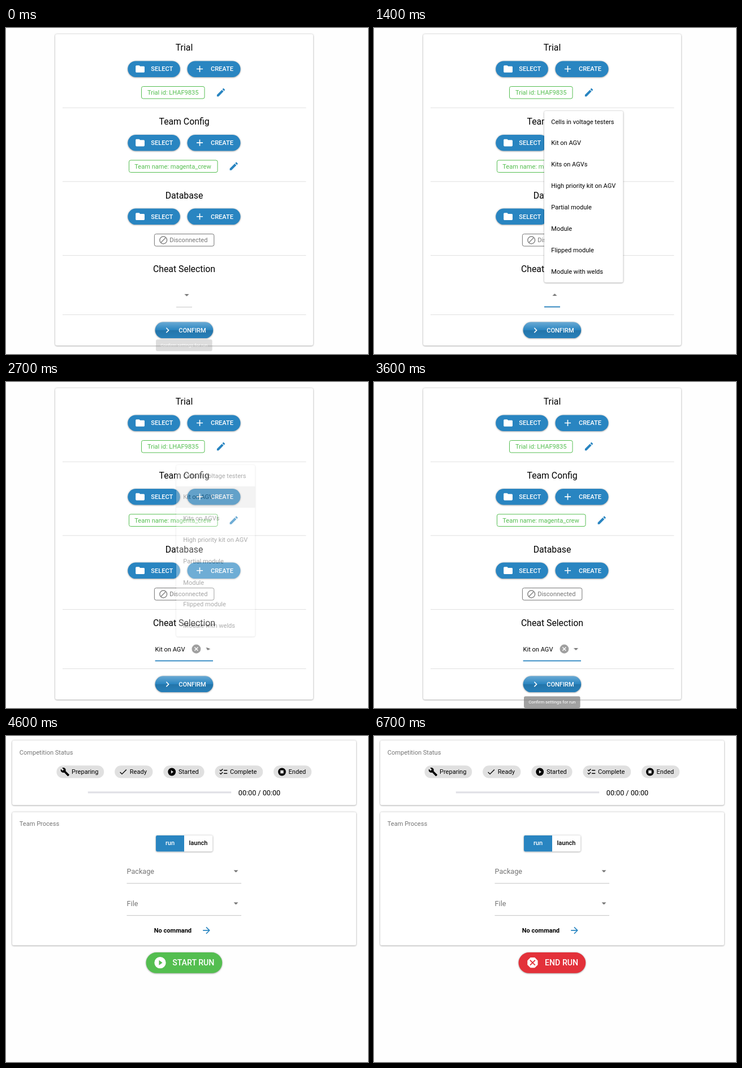
Animation of 640x577 px, one loop 8 s. Source, as an HTML page:

```html
<!DOCTYPE html>
<html lang="en">
<head>
<meta charset="utf-8">
<title>Run setup</title>
<style>
html, body { margin: 0; width: 100%; height: 100%; overflow: hidden; background: #fefefe; }
svg { display: block; width: 640px; height: 577px; font: 11.06px Roboto, sans-serif; --blue: #2985c1; --green: #54be50; }
.mid { text-anchor: middle; }
.title { font-size: 15.8px; }
.big { font-size: 12.64px; }
.btn { font-weight: 500; fill: #fff; color: #fff; }
.large { font-size: 14.2px; }
.grey { fill: #757575; }
.blue { fill: var(--blue); color: var(--blue); }
.arrow { color: #757575; }
.card { fill: #fff; }
.card, .raised { filter: drop-shadow(0 1.4px 1px rgba(0,0,0,.2)) drop-shadow(0 .6px 1.8px rgba(0,0,0,.24)); }
.rule { stroke: #e0e0e0; }
.line { stroke: #c2c2c2; }
.chip { fill: none; stroke: currentColor; }
.tip { font-size: 7.9px; fill: #fff; }

/* One loop is 8 s, so 1% is 80 ms. */
.setup, .run, .empty, .chosen, .start, .end { animation: 8s step-end infinite; }
.setup { animation-name: setup; }
.run { animation-name: run; }
.empty { animation-name: empty; }
.chosen { animation-name: chosen; }
.start { animation-name: start; }
.end { animation-name: end; }
@keyframes setup { 0% { visibility: visible } 50%, 100% { visibility: hidden } }
@keyframes run { 0% { visibility: hidden } 50%, 100% { visibility: visible } }
@keyframes empty { 0% { opacity: 1 } 31.25%, 100% { opacity: 0 } }
@keyframes chosen { 0% { opacity: 0 } 31.25%, 100% { opacity: 1 } }
@keyframes start { 0% { opacity: 1 } 76.25%, 100% { opacity: 0 } }
@keyframes end { 0% { opacity: 0 } 76.25%, 100% { opacity: 1 } }

.tip, .menu, .focus, .turn-up, .turn-down, .over, .glow { animation: 8s linear infinite; }
.tip { animation-name: tip; }
.menu { animation-name: menu; }
.focus { animation-name: focus; transform-origin: 315px 493px; }
.turn-up { animation-name: turn-up; transform-origin: 319.5px 472.5px; }
.turn-down { animation-name: turn-down; transform-origin: 357px 472.5px; }
.over { animation-name: over; }
.glow { animation-name: glow; }
@keyframes tip {
  0% { opacity: .25; transform: translateY(2.96px) }
  1.25%, 43.75% { opacity: 0; transform: translateY(0) }
  45% { opacity: .68; transform: translateY(8.06px) }
  46.9%, 100% { opacity: 1; transform: translateY(11.85px) }
}
@keyframes menu { 0%, 6.25% { opacity: 0 } 10%, 31.25% { opacity: 1 } 35%, 100% { opacity: 0 } }
@keyframes focus { 0%, 6.25% { transform: scaleX(0) } 10%, 100% { transform: scaleX(1) } }
@keyframes turn-up { 0%, 6.25% { transform: rotate(0) } 10%, 100% { transform: rotate(180deg) } }
@keyframes turn-down { 0%, 31.25% { transform: rotate(180deg) } 33.75% { transform: rotate(20deg) } 35%, 100% { transform: rotate(0) } }
@keyframes over {
  0% { opacity: 0; transform: translateY(227.7px) }
  18.7% { opacity: 0; transform: translateY(227.7px) }
  18.75% { opacity: 1; transform: translateY(227.7px); animation-timing-function: steps(6) }
  26.25%, 100% { opacity: 1; transform: translateY(0) }
}
@keyframes glow { 0%, 71.25% { opacity: 0 } 74%, 76.25% { opacity: .15 } 76.3%, 100% { opacity: 0 } }
</style>
</head>
<body>
<svg viewBox="0 0 640 577">
  <defs>
    <symbol id="folder" viewBox="0 0 24 24"><path fill="currentColor" d="M10 4H4c-1.1 0-2 .9-2 2v12c0 1.1.9 2 2 2h16c1.1 0 2-.9 2-2V8c0-1.1-.9-2-2-2h-8z"/></symbol>
    <symbol id="plus" viewBox="0 0 24 24"><path fill="currentColor" d="M19 13h-6v6h-2v-6H5v-2h6V5h2v6h6z"/></symbol>
    <symbol id="pencil" viewBox="0 0 24 24"><path fill="currentColor" d="M3 17.25V21h3.75L17.81 9.94l-3.75-3.75zM20.71 7.04c.39-.39.39-1.02 0-1.41l-2.34-2.34c-.39-.39-1.02-.39-1.41 0l-1.83 1.83 3.75 3.75z"/></symbol>
    <symbol id="drop" viewBox="0 0 24 24"><path fill="currentColor" d="M7 10l5 5 5-5z"/></symbol>
    <symbol id="next" viewBox="0 0 24 24"><path fill="currentColor" d="M10 6 8.59 7.41 13.17 12l-4.58 4.59L10 18l6-6z"/></symbol>
    <symbol id="forward" viewBox="0 0 24 24"><path fill="currentColor" d="M12 4l-1.41 1.41L16.17 11H4v2h12.17l-5.58 5.59L12 20l8-8z"/></symbol>
    <symbol id="wrench" viewBox="0 0 24 24"><path fill="currentColor" d="M22.7 19l-9.1-9.1c.9-2.3.4-5-1.5-6.9-2-2-5-2.4-7.4-1.3L9 6 6 9 1.6 4.7C.4 7.1.9 10.1 2.9 12.1c1.9 1.9 4.6 2.4 6.9 1.5l9.1 9.1c.4.4 1 .4 1.4 0l2.3-2.3c.5-.4.5-1.1.1-1.4z"/></symbol>
    <symbol id="check" viewBox="0 0 24 24"><path fill="currentColor" d="M9 16.17 4.83 12l-1.42 1.41L9 19 21 7l-1.41-1.41z"/></symbol>
    <symbol id="play" viewBox="0 0 24 24"><path fill="currentColor" fill-rule="evenodd" d="M12 2a10 10 0 1 0 0 20 10 10 0 0 0 0-20zM10 16.5v-9l6 4.5z"/></symbol>
    <symbol id="list" viewBox="0 0 24 24"><path fill="currentColor" d="M22 7h-9v2h9zM22 15h-9v2h9zM5.54 11 2 7.46l1.41-1.41 2.12 2.12 4.24-4.24 1.41 1.41zM5.54 19 2 15.46l1.41-1.41 2.12 2.12 4.24-4.24 1.41 1.41z"/></symbol>
    <symbol id="stop" viewBox="0 0 24 24"><path fill="currentColor" fill-rule="evenodd" d="M12 2a10 10 0 1 0 0 20 10 10 0 0 0 0-20zM8 8h8v8H8z"/></symbol>
    <symbol id="danger" viewBox="0 0 24 24"><path fill="currentColor" fill-rule="evenodd" d="M15.73 3H8.27L3 8.27v7.46L8.27 21h7.46L21 15.73V8.27zM17 15.74 15.74 17 12 13.26 8.26 17 7 15.74 10.74 12 7 8.26 8.26 7 12 10.74 15.74 7 17 8.26 13.26 12z"/></symbol>
    <linearGradient id="gloss" x2="0" y2="1">
      <stop stop-color="#fff" stop-opacity=".3"/>
      <stop offset=".5" stop-color="#fff" stop-opacity="0"/>
      <stop offset=".51" stop-opacity=".12"/>
      <stop offset="1" stop-opacity=".04"/>
    </linearGradient>
    <g id="pair" class="btn">
      <rect class="raised blue" x="215.3" y="58.4" width="92.5" height="28.5" rx="14.25"/>
      <use href="#folder" x="227.6" y="63" width="19" height="19"/>
      <text class="mid" x="275.7" y="76.4">SELECT</text>
      <rect class="raised blue" x="320.5" y="58.4" width="94" height="28.5" rx="14.25"/>
      <use href="#plus" x="333" y="63" width="19" height="19"/>
      <text class="mid" x="382" y="76.4">CREATE</text>
    </g>
  </defs>

  <g class="setup">
    <rect class="card" x="87" y="11" width="456" height="551" rx="3.2"/>
    <g class="title mid">
      <text x="315" y="40.4">Trial</text>
      <text x="315" y="171.1">Team Config</text>
      <text x="315" y="301.8">Database</text>
      <text x="315" y="432.3">Cheat Selection</text>
    </g>
    <path class="rule" d="M100 141.2H530.5M100 271.8H530.5M100 402.5H530.5M100 507.5H530.5"/>
    <use href="#pair"/>
    <use href="#pair" y="130.6"/>
    <use href="#pair" y="261.2"/>

    <g color="#54be50" fill="#54be50">
      <rect class="chip" x="239.5" y="103.5" width="111.5" height="21.5" rx="3"/>
      <text class="mid" x="295.2" y="118.2">Trial id: LHAF9835</text>
      <rect class="chip" x="217.5" y="234" width="156.5" height="21.5" rx="3"/>
      <text x="227.3" y="248.8">Team name: magenta_crew</text>
    </g>
    <g class="blue">
      <use href="#pencil" x="370.5" y="104.5" width="19" height="19"/>
      <use href="#pencil" x="393.2" y="235.2" width="19" height="19"/>
    </g>
    <g class="grey" color="#757575">
      <rect class="chip" x="262.4" y="364.6" width="105.4" height="21.5" rx="3"/>
      <path d="M282.5 371 273.5 380M284.6 375.5a6.4 6.4 0 1 1-12.8 0a6.4 6.4 0 1 1 12.8 0" fill="none" stroke="#858585" stroke-width="1.5"/>
      <text x="289.2" y="379.4">Disconnected</text>
    </g>

    <g class="empty">
      <path class="line" d="M301 494H329"/>
      <rect class="focus blue" x="301" y="492.6" width="28" height="1.8"/>
      <g class="arrow turn-up"><use href="#drop" x="310" y="463" width="19" height="19"/></g>
    </g>
    <g class="chosen">
      <rect class="blue" x="263.6" y="492.6" width="102.4" height="1.8"/>
      <text x="263.6" y="476.5">Kit on AGV</text>
      <circle cx="336.4" cy="472.5" r="7.9" fill="#a0a0a0"/>
      <path d="M333.4 469.5l6 6m0-6l-6 6" stroke="#fff" stroke-width="1.5"/>
      <g class="arrow turn-down"><use href="#drop" x="347.5" y="463" width="19" height="19"/></g>
    </g>

    <g class="btn">
      <rect class="raised blue" x="263.6" y="520.6" width="102.6" height="28.5" rx="14.25"/>
      <rect x="263.6" y="520.6" width="102.6" height="28.5" rx="14.25" fill="url(#gloss)"/>
      <use href="#next" x="276" y="525.4" width="19" height="19"/>
      <text class="mid" x="329.4" y="538.6">CONFIRM</text>
    </g>

    <g class="menu">
      <rect class="card" x="301" y="147" width="139.4" height="303.6" rx="3"/>
      <rect class="over" x="301" y="184.6" width="139.4" height="37.95" fill-opacity=".15"/>
      <g id="items"></g>
    </g>

    <g class="tip">
      <rect x="265" y="548.2" width="99.6" height="20.8" rx="3" fill="#757575"/>
      <text class="mid" x="314.8" y="561.4">Confirm settings for run</text>
    </g>
  </g>

  <g class="run">
    <rect class="card" x="11" y="8" width="608" height="114.2" rx="3.2"/>
    <rect class="card" x="11" y="134.8" width="608" height="235.8" rx="3.2"/>
    <text class="grey" x="23.8" y="32.5">Competition Status</text>
    <text class="grey" x="23.8" y="159.2">Team Process</text>
    <g id="stages"></g>
    <rect x="144.8" y="98.2" width="253.4" height="3.2" fill="#e0e0e6"/>
    <text class="big" x="410.8" y="104.5">00:00 / 00:00</text>

    <g class="mid" font-weight="500">
      <rect class="card" x="265" y="176" width="100.3" height="28.4" rx="2.4"/>
      <path class="blue" d="M315 176H267.4a2.4 2.4 0 0 0-2.4 2.4v23.6a2.4 2.4 0 0 0 2.4 2.4H315z"/>
      <text x="290" y="193.3" fill="#fff">run</text>
      <text x="340" y="193.3">launch</text>
    </g>
    <g class="big grey">
      <text x="213.6" y="244">Package</text>
      <text x="213.6" y="301">File</text>
    </g>
    <path class="line" d="M213.5 260.8H416M213.5 317.7H416"/>
    <g class="arrow">
      <use href="#drop" x="397" y="229.6" width="19" height="19"/>
      <use href="#drop" x="397" y="286.6" width="19" height="19"/>
    </g>
    <text x="261.8" y="347.5" font-weight="700">No command</text>
    <g class="blue"><use href="#forward" x="345" y="334.6" width="19" height="19"/></g>

    <g class="start btn large">
      <rect class="raised" x="247.6" y="383" width="134.6" height="36.8" rx="18.4" fill="#54be50"/>
      <rect class="glow" x="247.6" y="383" width="134.6" height="36.8" rx="18.4"/>
      <use href="#play" x="260.3" y="389" width="24.4" height="24.4"/>
      <text x="294.2" y="406.3">START RUN</text>
    </g>
    <g class="end btn large">
      <rect class="raised" x="255.6" y="383" width="118.6" height="36.8" rx="18.4" fill="#e3313a"/>
      <use href="#danger" x="268.2" y="389" width="24.4" height="24.4"/>
      <text x="302" y="406.3">END RUN</text>
    </g>
  </g>
</svg>
<script>
const fill = (id, rows, draw) => {
  document.getElementById(id).innerHTML = rows.map(draw).join('');
};

fill('items', [
  'Cells in voltage testers', 'Kit on AGV', 'Kits on AGVs', 'High priority kit on AGV',
  'Partial module', 'Module', 'Flipped module', 'Module with welds'
], (label, i) => `<text x="313.3" y="${169.5 + 37.95 * i}">${label}</text>`);

fill('stages', [
  ['Preparing', 'wrench', 89.4, 83.8], ['Ready', 'check', 192.2, 67.2], ['Started', 'play', 278.3, 72.2],
  ['Complete', 'list', 369.4, 84.8], ['Ended', 'stop', 473, 67.2]
], ([label, icon, x, width]) => `
  <rect x="${x}" y="52.3" width="${width}" height="22.2" rx="11.1" fill="#e0e0e0"/>
  <use href="#${icon}" x="${x + 6.6}" y="55.2" width="16.6" height="16.6"/>
  <text x="${x + 26.6}" y="67.4">${label}</text>`);
</script>
</body>
</html>
```
